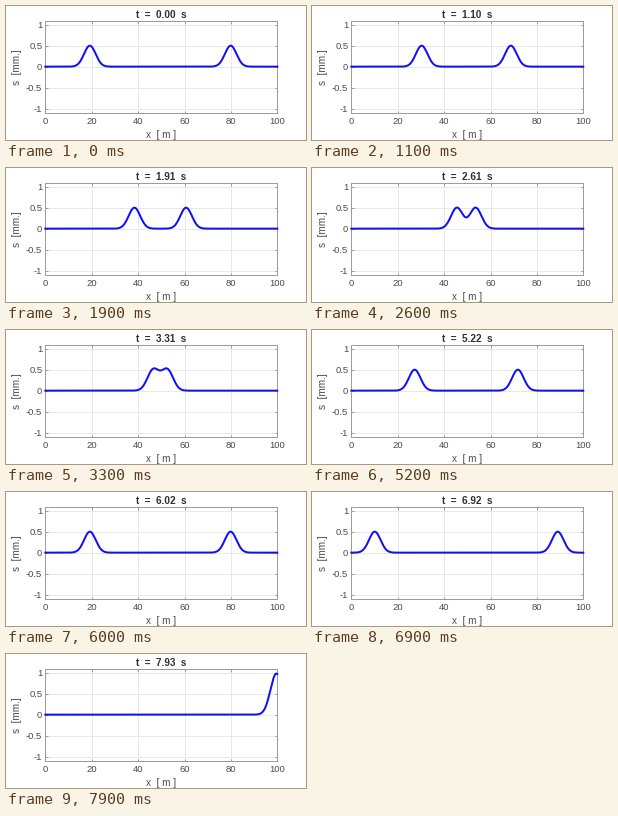
Write a matplotlib script that moves like this. It is 300 px wide and 134 px high and loops after 8000 ms.

```python
import numpy as np
import matplotlib.pyplot as plt
from matplotlib.animation import FuncAnimation

W, H, DPI = 300, 134, 100
FRAMES, INTERVAL = 80, 100
DT = 30 / 299            # simulated seconds per frame
SPEED, WIDTH2 = 10.08, 12.5
RIGHT_GOING, LEFT_GOING = 19.2, 79.9
FIXED_END, FREE_END = 0, 99.6
INK, FRAME, GRID = "#4c4c4c", "#9c9c9c", "#e8e8e8"


def px(n):
    """Pixels to points."""
    return n * 72 / DPI


def pulse(x, centre):
    return 0.5 * np.exp(-(x - centre) ** 2 / WIDTH2)


def wave(x, t):
    """Two travelling pulses, mirrored upright at the free end and inverted at the fixed end."""
    a = RIGHT_GOING + SPEED * t
    b = LEFT_GOING - SPEED * t
    return (pulse(x, a) + pulse(x, 2 * FREE_END - a)
            + pulse(x, b) - pulse(x, 2 * FIXED_END - b))


plt.rcParams.update({
    "font.family": "Liberation Sans",
    "text.color": INK,
    "axes.unicode_minus": False,
})

fig = plt.figure(figsize=(W / DPI, H / DPI), dpi=DPI, facecolor="white")
left, right, top, bottom = 39.3, 271.3, 14.5, 106.8
ax = fig.add_axes([left / W, 1 - bottom / H, (right - left) / W, (bottom - top) / H])
ax.set(xlim=(0, 100), ylim=(-1.1, 1.1))
ax.set_xticks(range(0, 101, 20))
ax.set_yticks([-1, -0.5, 0, 0.5, 1], ["-1", "-0.5", "0", "0.5", "1"])
ax.set_axisbelow(True)
ax.grid(color=GRID, lw=px(1))
ax.tick_params(direction="in", length=px(2.5), width=px(1), color=FRAME,
               top=True, right=True, labelsize=px(9.5), labelcolor=INK, pad=px(3))
ax.tick_params(axis="x", pad=px(4))
for side in ax.spines.values():
    side.set(linewidth=px(1), color=FRAME)


def label(x, y, text, size, **style):
    return fig.text(x / W, 1 - y / H, text, fontsize=px(size), ha="center", **style)


label(155, 131.5, "x  [ m ]", 10, va="baseline")
label(11.5, 61, "s  [mm.]", 10, va="center", rotation=90)
title = label(155, 11.5, "", 10, va="baseline", weight="bold", color="#303030")

x = np.linspace(0, 100, 801)
line, = ax.plot(x, 0 * x, color="#1010f8", lw=px(2), zorder=5,
                clip_on=False, solid_joinstyle="round")


def update(i):
    t = i * DT
    line.set_ydata(wave(x, t))
    title.set_text(f"t  =  {t:.2f}  s")
    return line, title


anim = FuncAnimation(fig, update, frames=FRAMES, interval=INTERVAL,
                     repeat=True, repeat_delay=0)
plt.show()
```
